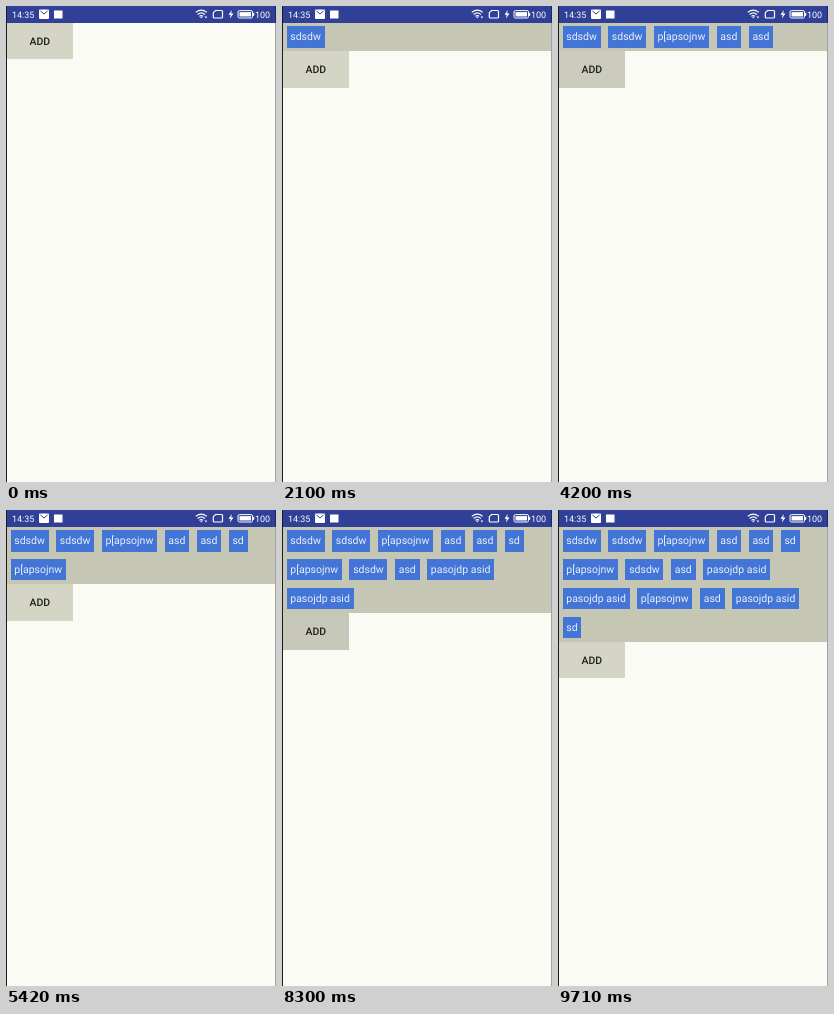
An HTML page that plays this animation: 270 by 476 pixels, repeating every 9.77 s.

```html
<!DOCTYPE html>
<html lang="en">
<head>
<meta charset="utf-8">
<title>Flow layout</title>
<style>
  html, body { margin: 0; width: 100%; height: 100%; overflow: hidden; }
  body {
    position: relative;
    background: #fbfbf6;
    font: 10.5px Roboto, sans-serif;
    text-rendering: geometricPrecision;
  }
  #status { position: absolute; left: 0; top: 0; width: 270px; height: 17px; background: #2f4096; }
  #status svg { display: block; }
  #page { position: absolute; left: .75px; top: 16.5px; width: 268.5px; }
  #flow { display: flex; flex-wrap: wrap; background: #c6c6b4; }
  .chip {
    margin: 3.75px;
    padding: 0 3.75px;
    height: 21.3px;
    line-height: 21.3px;
    white-space: pre;
    color: #e9f0fb;
    background: #4375d6;
  }
  .chip[hidden] { display: none; }
  #add {
    position: relative;
    overflow: hidden;
    width: 66px;
    height: 36.75px;
    line-height: 38.4px;
    text-align: center;
    font-weight: 500;
    color: #1e1e1a;
    background: #d5d5c6;
  }
  #tint, #ripple { position: absolute; background: #000; opacity: 0; }
  #tint { inset: 0; }
  #ripple { left: -5px; top: -19.6px; width: 76px; height: 76px; border-radius: 50%; }
  #add span { position: relative; }
  .edge { position: absolute; top: 0; width: 1px; height: 476px; }
</style>
</head>
<body>
<div id="page">
  <div id="flow"></div>
  <div id="add"><i id="tint"></i><i id="ripple"></i><span>ADD</span></div>
</div>
<div id="status">
  <svg width="270" height="17" fill="#fff" font-family="Roboto, sans-serif" font-size="9">
    <text x="6" y="11.5">14:35</text>
    <rect x="33" y="3.5" width="10" height="9.5" rx="1"/>
    <path d="M34.5 5 38 8 41.5 5" fill="none" stroke="#2f4096"/>
    <rect x="48" y="4.5" width="8.5" height="8"/>
    <g fill="none" stroke="#fff" stroke-width="1.2">
      <path d="M189.8 6.4Q195.3 1.8 200.8 6.4M191.7 8.5Q195.3 5.2 198.9 8.5M193.4 10.4Q195.3 8.8 197.2 10.4"/>
      <path d="M209.5 4.5H215.5Q216.5 4.5 216.5 5.5V11Q216.5 12 215.5 12H208.3Q207.3 12 207.3 11V6.7Z"/>
      <rect x="232" y="4.6" width="14.5" height="7.4" rx="1.4" stroke-width="1"/>
    </g>
    <path d="M194.2 11h2.2l-1.1 1.6zM198.6 10.6h2.6l-1.3 2z"/>
    <path d="M225.8 4 222.5 8.8H224.7L224 12.5 227.5 7.6H225.2Z"/>
    <rect x="233.5" y="6.1" width="11.5" height="4.4"/>
    <rect x="247" y="6.8" width="1.2" height="3"/>
    <text x="249" y="11.5">100</text>
  </svg>
</div>
<div class="edge" style="left:0;background:#1c1c18"></div>
<div class="edge" style="left:269px;background:rgba(0,0,0,.35)"></div>
<script>
  const LOOP = 9770, CLICK = 100, END = 420;
  const taps = [
    [1190, 'sdsdw'], [2100, 'sdsdw'], [2820, 'p[apsojnw'], [3350, 'asd'], [3890, 'asd'],
    [4430, 'sd'], [5000, 'p[apsojnw'], [6750, 'sdsdw'], [7300, 'asd'], [7740, 'pasojdp asid'],
    [8040, 'pasojdp asid'], [8660, 'p[apsojnw'], [8870, 'asd'], [9080, 'pasojdp asid'], [9290, 'sd']
  ];
  const byId = id => document.getElementById(id);
  const flow = byId('flow'), tint = byId('tint'), ripple = byId('ripple');
  const clamp = v => Math.min(1, Math.max(0, v));

  const chips = taps.map(([, label]) => {
    const chip = document.createElement('div');
    chip.className = 'chip';
    chip.textContent = label;
    chip.hidden = true;
    return flow.appendChild(chip);
  });

  // Fades in while pressed, out after the click.
  function pressure(age) {
    if (age < 0 || age > END) return 0;
    return clamp(age / 80) * (1 - clamp((age - CLICK) / (END - CLICK)));
  }

  function draw(t) {
    let level = 0, last = -LOOP;
    taps.forEach(([start], i) => {
      chips[i].hidden = t < start + CLICK;
      level = Math.max(level, pressure(t - start));
      if (t >= start) last = start;
    });
    const spread = 1 - (1 - clamp((t - last) / 225)) ** 2;
    tint.style.opacity = .08 * level;
    ripple.style.opacity = .05 * pressure(t - last);
    ripple.style.transform = `scale(${.4 + .6 * spread})`;
  }

  const begin = performance.now();
  function tick() {
    draw((performance.now() - begin) % LOOP);
    requestAnimationFrame(tick);
  }
  draw(0);
  requestAnimationFrame(tick);
</script>
</body>
</html>
```
